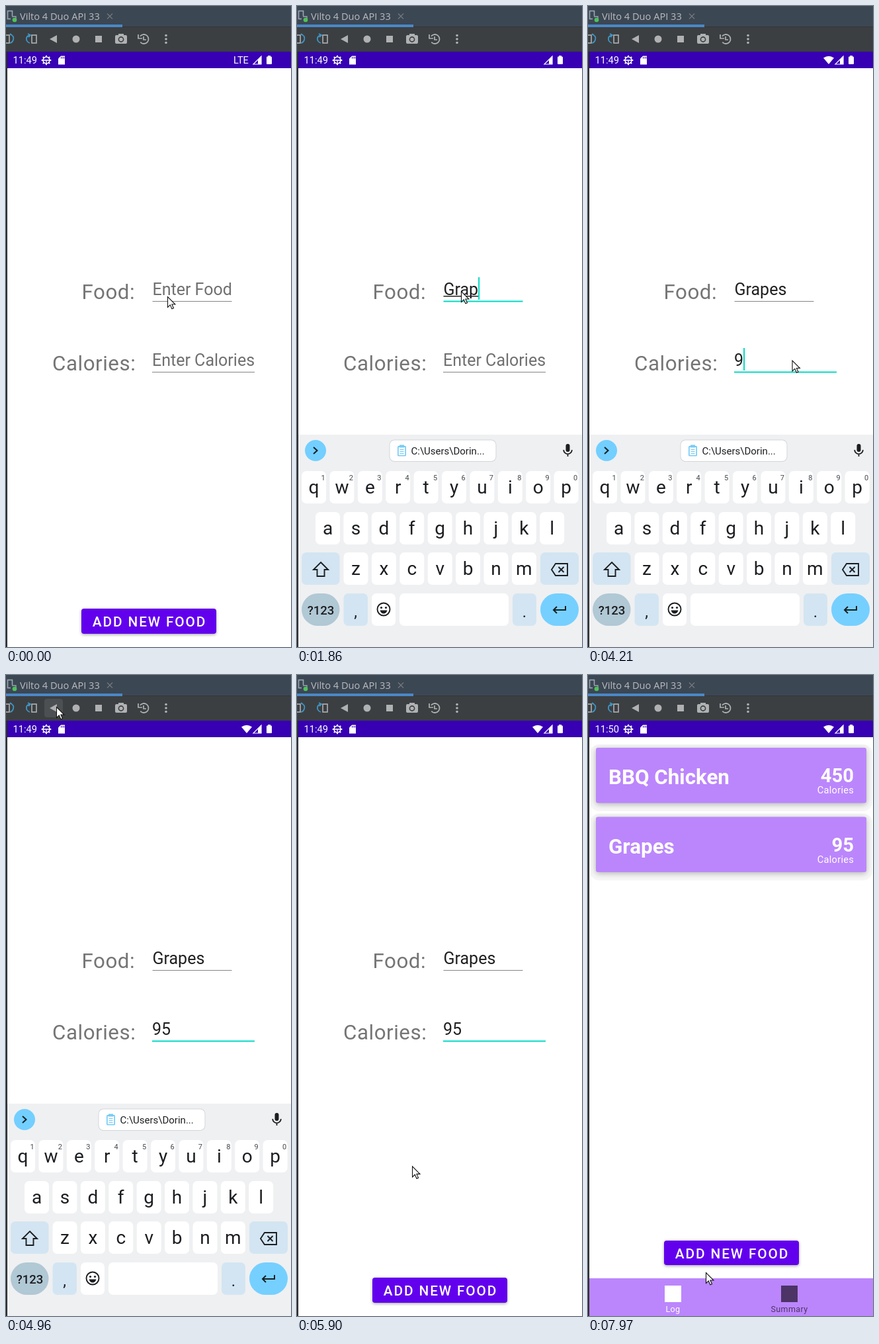
Write an HTML page with a canvas that moves like this. It is 431 px wide and 969 px high and loops after 8 s.

```html
<!DOCTYPE html>
<html lang="en">
<head>
<meta charset="utf-8">
<title>Food log demo</title>
<style>
html, body { margin: 0; width: 100%; height: 100%; overflow: hidden; background: #fff; }
canvas { display: block; width: 431px; height: 969px; }
</style>
</head>
<body>
<canvas id="stage"></canvas>
<script>
const W = 431, H = 969, LOOP = 8000;
const TEAL = '#03dac5', INDIGO = '#6200ee', LILAC = '#bb86fc', ICON = '#afb1b3';
const SANS = 'Roboto, sans-serif';
const dpr = window.devicePixelRatio || 1;
const stage = document.getElementById('stage');
const layer = document.createElement('canvas');
for (const c of [stage, layer]) { c.width = W * dpr; c.height = H * dpr; }
const main = stage.getContext('2d'), over = layer.getContext('2d');
let g = main;

const clamp = u => Math.max(0, Math.min(1, u));
const span = (t, a, b) => clamp((t - a) / (b - a));
const smooth = u => u * u * (3 - 2 * u);
const easeOut = u => 1 - (1 - u) ** 2;
const within = (t, list) => list.some(([a, b]) => t >= a && t < b);

// ---- drawing helpers ----
function rect(x, y, w, h, color) { g.fillStyle = color; g.fillRect(x, y, w, h); }

function round(x, y, w, h, r, color) {
  g.fillStyle = color;
  g.beginPath(); g.roundRect(x, y, w, h, r); g.fill();
}

function disc(x, y, r, color) {
  g.fillStyle = color;
  g.beginPath(); g.arc(x, y, r, 0, 7); g.fill();
}

function ring(x, y, r, color, width, a = 0, b = Math.PI * 2) {
  g.strokeStyle = color; g.lineWidth = width;
  g.beginPath(); g.arc(x, y, r, a, b); g.stroke();
}

function path(d, x, y, fill, stroke, width = 1.5) {
  const p = new Path2D(d);
  g.save();
  g.translate(x, y);
  if (fill) { g.fillStyle = fill; g.fill(p); }
  if (stroke) { g.strokeStyle = stroke; g.lineWidth = width; g.stroke(p); }
  g.restore();
}

function text(s, x, y, size, color, o = {}) {
  g.font = `${o.weight || 400} ${size}px ${o.family || SANS}`;
  g.letterSpacing = (o.gap || 0) + 'px';
  g.textAlign = o.align || 'left';
  g.fillStyle = color;
  g.fillText(s, x, y);
}

function shadow(color, blur, dy, draw) {
  g.save();
  g.shadowColor = color; g.shadowBlur = blur * dpr; g.shadowOffsetY = dy * dpr;
  draw();
  g.restore();
}

// ---- emulator frame ----
function phoneIcon(x, y, color) {
  g.strokeStyle = color; g.lineWidth = 1.6;
  g.strokeRect(x, y, 7, 12);
}

function header(hover) {
  rect(0, 0, W, 32, '#3c4754');
  rect(0, 31, W, 1, '#323638');
  rect(0, 32, W, 37, '#3c3f41');
  rect(0, 28, 176, 4, '#4a88c7');
  phoneIcon(2.5, 7.5, '#9aa7b0');
  rect(7, 15, 9, 9, '#3c4754');
  path('M0 0h6v6', 9, 16, null, '#9aa7b0', 1.3);
  disc(13, 21, 3.3, '#4fc25a');
  text('Vilto 4 Duo API 33', 21, 21, 14.6, '#bbbcbe', { family: '"Open Sans", "Noto Sans", sans-serif' });
  path('M-4 -4L4 4M4 -4L-4 4', 157, 15.5, null, '#74797e', 1.2);

  if (hover) round(58, 36, 28, 28, 4, '#4c5052');
  phoneIcon(-2, 44, ICON);
  path('M6 43Q13 45 11 51Q10 55 6 56M9 44l-3 -2', 0, 0, null, '#3f97c8', 1.8);
  phoneIcon(39, 44, ICON);
  path('M36 56Q30 54 31 48Q32 45 37 44M33 42l4 2l-3 3', 0, 0, null, '#3f97c8', 1.8);
  path('M0 0L11 -6V6Z', 66, 50, ICON);
  disc(106, 50, 5.5, ICON);
  rect(135, 45, 10, 10, ICON);
  round(165, 44, 18, 13, 2, ICON);
  rect(170, 42, 8, 3, ICON);
  ring(174, 50.5, 3.6, '#3c3f41', 1.6);
  ring(208.5, 50, 7, ICON, 1.8, -2.5, 2.4);
  path('M200 43v6h6M208 46v5h4', 0, 0, null, ICON, 1.7);
  for (const y of [44.5, 50, 55.5]) disc(242, y, 1.8, ICON);
}

function statusBar(t) {
  rect(2, 69, W, 25, '#3700b3');
  text(t < 6100 ? '11:49' : '11:50', 10.5, 87, 14.6, '#fff');
  ring(61, 82, 5, '#fff', 1.6);
  for (let i = 0; i < 8; i++) {
    const a = i * Math.PI / 4, c = Math.cos(a), s = Math.sin(a);
    path(`M${c * 5} ${s * 5}L${c * 7.3} ${s * 7.3}`, 61, 82, null, '#fff', 2);
  }
  path('M-5 0H5M0 0V5', 61, 82, null, '#fff', 1.3);
  path('M4 0H10V13H0V4Z', 79, 75.5, '#fff');
  for (const x of [83, 85.3, 87.3]) rect(x, 77, 1, 2.5, '#3700b3');

  if (t < 980) text('LTE', 344, 87, 14.6, '#fff');
  if (t >= 2600) path('M0 12L-8 2.5Q0 -3 8 2.5Z', 364, 76, '#fff');
  path('M0 12L12 0V12Z', 374, 76, null, '#fff', 1.2);
  path('M7 5L12 0V12H7Z', 374, 76, '#fff');
  round(394, 76.5, 8, 11.5, 1, '#fff');
  rect(396, 75, 4, 2, '#fff');
}

// ---- form screen ----
const foodKeys = [1290, 1480, 1650, 1860, 1920, 2140];
const calKeys = [3960, 4230];
const foodCaret = [[210, 710], [1210, 2640]];
const calCaret = [[3210, 3710], [3960, 4660], [5180, 5640], [6140, 6630]];
const typed = (word, keys, t) => word.slice(0, keys.filter(k => t >= k).length);

function field(x, base, width, hint, value, focused, caret, composing) {
  text(value || hint, x, base, 25, value ? '#202020' : '#707070');
  const end = value ? g.measureText(value).width : 0;
  if (composing && value) rect(x, base + 1, end, 1.5, '#202020');
  if (focused) rect(x, base + 8.5, width, 2, TEAL);
  else rect(x, base + 9, width, 1, '#858585');
  if (caret) rect(x + end, base - 27, 2, 34, TEAL);
}

function button(x, y, h) {
  shadow('rgba(0,0,0,.35)', 4, 1.5, () => round(x, y, 204, h, 4, INDIGO));
  text('ADD NEW FOOD', x + 103, y + 27, 20.8, '#fff', { weight: 500, gap: 1.86, align: 'center' });
}

function form(t) {
  rect(-50, 94, W + 100, H, '#fff');
  text('Food:', 114.5, 443, 31.3, '#757575', { gap: 0.55 });
  text('Calories:', 70, 551, 31.3, '#757575', { gap: 0.55 });
  const onFood = t >= 210 && t < 3150, onCal = t >= 3150;
  field(221.5, 437, 120, 'Enter Food', typed('Grapes', foodKeys, t), onFood, within(t, foodCaret), onFood);
  field(221, 544, 155, 'Enter Calories', typed('95', calKeys, t), onCal, within(t, calCaret), false);
  button(114, 911, 38);
  if (t >= 6860) {
    g.save();
    g.beginPath(); g.roundRect(114, 911, 204, 38, 4); g.clip();
    disc(181, 929, 15 + 145 * easeOut(span(t, 6860, 7150)), 'rgba(255,255,255,.2)');
    g.restore();
  }
}

// ---- log screen ----
function card(y, name, amount) {
  round(3, y - 5, 427, 101, 14, '#f6f6f6');
  shadow('rgba(0,0,0,.28)', 9, 2, () => round(12, y, 409, 83.5, 3, LILAC));
  text(name, 31, y + 55, 31.3, '#fff', { weight: 700 });
  text(amount, 402, y + 52, 29.2, '#fff', { weight: 700, align: 'right' });
  text('Calories', 402, y + 69, 14.6, '#fff', { gap: 0.26, align: 'right' });
}

function tab(x, label, box, ink) {
  rect(x - 12.5, 923, 25, 25, box);
  text(label, x, 963, 12.5, ink, { gap: 0.4, align: 'center' });
}

function log() {
  rect(-50, 94, W + 100, H, '#fff');
  card(110, 'BBQ Chicken', '450');
  card(214.5, 'Grapes', '95');
  button(115, 855, 37);
  rect(-50, 912, W + 100, 57, LILAC);
  tab(128.5, 'Log', '#fff', '#fff');
  tab(304.5, 'Summary', '#4c3467', '#4c3467');
}

// Two-part curve: quick rise, long settle.
function settle(x) {
  const [p, q] = x < 1 / 6
    ? [[0, .05, .1333, 1 / 6], [0, 0, .06, .4]]
    : [[1 / 6, .2083, .25, 1], [.4, .82, 1, 1]];
  const at = (c, u) => c[0] * (1 - u) ** 3 + 3 * c[1] * u * (1 - u) ** 2 + 3 * c[2] * u * u * (1 - u) + c[3] * u ** 3;
  let lo = 0, hi = 1;
  for (let i = 0; i < 24; i++) {
    const mid = (lo + hi) / 2;
    if (at(p, mid) < x) lo = mid; else hi = mid;
  }
  return at(q, lo);
}

function screens(t) {
  const move = settle(span(t, 7010, 7460)), alpha = span(t, 7060, 7143);
  main.save();
  main.beginPath(); main.rect(2, 94, W, H); main.clip();
  if (alpha < 1) {
    main.save();
    main.translate(-43 * move, 0);
    form(t);
    main.restore();
  }
  if (alpha > 0) {
    g = over;
    g.setTransform(dpr, 0, 0, dpr, 0, 0);
    g.clearRect(0, 0, W, H);
    g.translate(43 * (1 - move), 0);
    log();
    g = main;
    g.globalAlpha = alpha;
    g.drawImage(layer, 0, 0, W, H);
  }
  main.restore();
}

// ---- keyboard ----
const PITCH = 42.4, DARK = '#1c1e21', PALE = '#d3e5f2';

function keyRow(letters, x, y, caps, hints) {
  [...letters].forEach((c, i) => {
    const kx = x + i * PITCH;
    round(kx, y, 37, 49, 7, '#fff');
    text(caps ? c.toUpperCase() : c, kx + 18.5, y + 34, 28, DARK, { align: 'center' });
    if (hints) text(String((i + 1) % 10), kx + 32.5, y + 14, 11, '#44474b', { align: 'center' });
  });
}

function keyboard(t) {
  const up = easeOut(span(t, 320, 610)) * (1 - smooth(span(t, 5270, 5530)));
  if (up <= 0) return;
  const caps = t >= 1070 && t < 1350;
  g.save();
  g.beginPath(); g.rect(2, 94, W, H); g.clip();
  g.translate(0, 321 * (1 - up));
  rect(2, 648, W, 321, '#eff0f2');

  disc(28, 672, 16, '#72cfff');
  path('M-3 -5L2.5 0L-3 5', 28, 672, null, DARK, 2);
  round(139.5, 655.5, 162, 33.5, 8, '#d3d5d8');
  round(140.5, 656.5, 160, 31.5, 7, '#fff');
  round(152, 665, 13, 15.5, 1.5, '#78cbf5');
  rect(153.7, 667, 9.6, 12, '#fff');
  rect(155, 663.5, 7, 4, '#78cbf5');
  for (const y of [670, 673, 676]) rect(155.5, y, 6, 1.2, '#78cbf5');
  text('C:\\Users\\Dorin...', 172.5, 678, 15, DARK);
  round(406.5, 662, 6, 12, 3, DARK);
  path('M-6.3 0A6.3 6.3 0 0 0 6.3 0M0 6V10', 409.5, 671, null, DARK, 1.8);

  keyRow('qwertyuiop', 7, 703, caps, true);
  keyRow('asdfghjkl', 28, 765, caps);
  keyRow('zxcvbnm', 70.5, 826, caps);

  round(7, 826, 57.5, 49, 7, PALE);
  path('M0 -11L11 0H5.5V10H-5.5V0H-11Z', 36, 852, caps ? DARK : null, DARK, 1.9);
  round(368, 826, 58, 49, 7, PALE);
  path('M-12 0L-6 -9H12V9H-6Z', 397, 852, null, DARK, 1.9);
  path('M-3 -4L5 4M5 -4L-3 4', 398.5, 852, null, DARK, 1.9);

  round(7, 888, 57.5, 49, 24.5, '#b1c8d5');
  text('?123', 36, 919.5, 18.5, DARK, { align: 'center', weight: 500 });
  round(70.5, 888, 36.5, 49, 7, PALE);
  text(',', 88.5, 924, 24, DARK, { align: 'center' });
  round(113, 888, 36, 49, 7, '#fff');
  ring(131, 912, 9.5, DARK, 1.9);
  disc(127.5, 909.5, 1.6, DARK);
  disc(134.5, 909.5, 1.6, DARK);
  path('M-5.5 0H5.5Q4 5 0 5T-5.5 0Z', 131, 913.5, DARK);
  round(155, 888, 165, 49, 7, '#fff');
  round(326, 888, 36, 49, 7, PALE);
  text('.', 344, 924, 24, DARK, { align: 'center' });
  round(368, 888, 58, 49, 24.5, '#75d0ff');
  path('M9 -6V0H-9M-4 -5L-9 0L-4 5', 397, 913, null, DARK, 2);
  g.restore();
}

// ---- pointer ----
const gather = u => (u + smooth(u)) / 2;
const stops = [
  [30, 244.5, 439.5], [150, 248.5, 431.5],
  [2360, 248.5, 431.5], [2840, 309, 536],
  [4240, 309, 536], [4960, 76.5, 48.5],
  [5400, 76.5, 48.5], [5900, 174.5, 742, gather], [6310, 180.5, 927, easeOut],
  [7870, 180.5, 927], [7970, 178.5, 903.5]
];

function pointerAt(t) {
  const i = stops.findIndex(s => t < s[0]);
  if (i === 0) return stops[0].slice(1, 3);
  if (i < 0) return stops[stops.length - 1].slice(1, 3);
  const a = stops[i - 1], b = stops[i];
  const u = (b[3] || smooth)(span(t, a[0], b[0]));
  return [a[1] + (b[1] - a[1]) * u, a[2] + (b[2] - a[2]) * u];
}

function draw(t) {
  g = main;
  g.setTransform(dpr, 0, 0, dpr, 0, 0);
  rect(0, 0, W, H, '#2b2d2f');
  const [x, y] = pointerAt(t);
  screens(t);
  keyboard(t);
  header(x > 58 && x < 86 && y > 36 && y < 64);
  statusBar(t);
  path('M0 0V16L3.8 12.4L6.4 18.3L9 17.2L6.4 11.5H11.4Z', x, y, '#fff', '#111', 1.1);
}

const start = performance.now();
function tick() {
  draw((performance.now() - start) % LOOP);
  requestAnimationFrame(tick);
}
tick();
</script>
</body>
</html>
```
